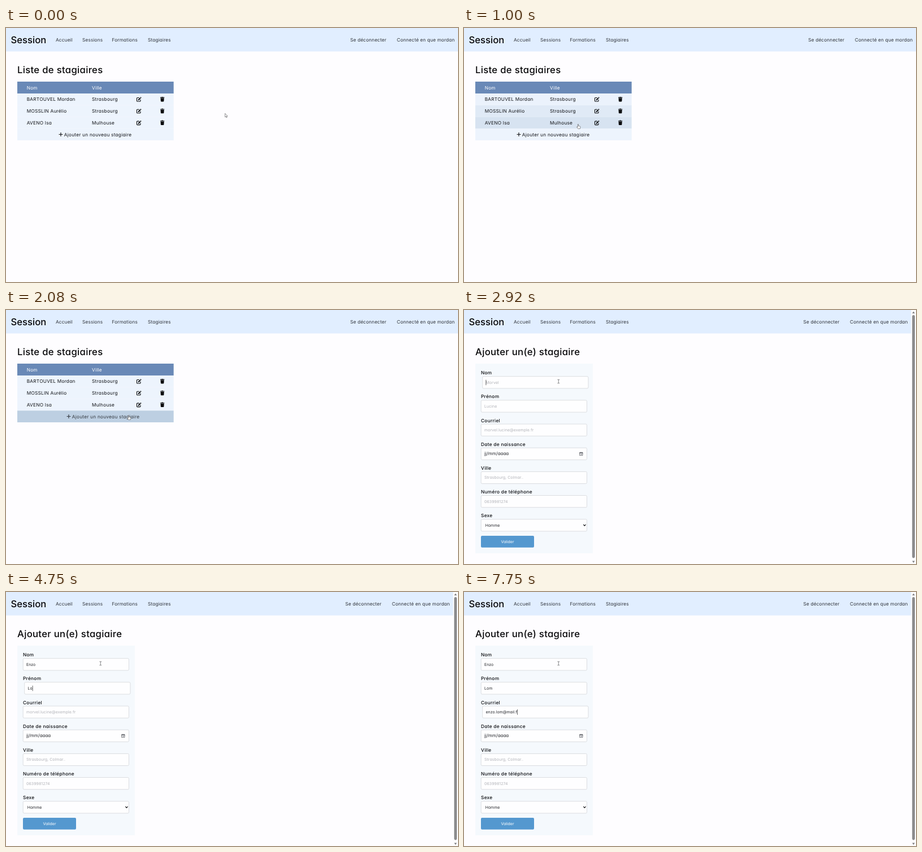
An HTML page that plays this animation: 800 by 450 pixels, repeating every 8 s.

```html
<!DOCTYPE html>
<html lang="fr">
<head>
<meta charset="utf-8">
<style>
html, body { margin: 0; width: 100%; height: 100%; overflow: hidden; background: #fefdff; }
svg { display: block; width: 800px; height: 450px; }
text { font-family: Inter, "Open Sans", sans-serif; font-feature-settings: "cv11"; text-rendering: geometricPrecision; white-space: pre; }
.nav { font-size: 8.3px; letter-spacing: .13px; fill: #32363c; }
.cell { font-size: 8.3px; letter-spacing: .22px; fill: #14161a; }
.brand, .title { font-size: 16.7px; font-weight: 500; fill: #08080a; }
.title { letter-spacing: .3px; }
.label { font-size: 8.3px; font-weight: 500; letter-spacing: .28px; fill: #0c0d10; }
.val { font-size: 7px; fill: #25272b; }
.hint { font-size: 7px; letter-spacing: .04px; fill: #b2b3b8; }
</style>
</head>
<body>
<svg id="stage" viewBox="0 0 800 450"></svg>
<script>
const LOOP = 8000, PAGE = 2250;
const stage = document.getElementById('stage');

function el(parent, tag, attrs, content) {
  const node = document.createElementNS('http://www.w3.org/2000/svg', tag);
  for (const k in attrs) node.setAttribute(k, attrs[k]);
  if (content) node.textContent = content;
  parent.appendChild(node);
  return node;
}
const set = (node, k, v) => node.setAttribute(k, v);
const group = parent => el(parent, 'g', {});
const rect = (p, x, y, width, height, fill, extra) => el(p, 'rect', { x, y, width, height, fill, ...extra });
const text = (p, x, y, cls, s) => el(p, 'text', { x, y, class: cls }, s);
const path = (p, d, extra) => el(p, 'path', { d, ...extra });
const show = (node, on) => set(node, 'visibility', on ? 'visible' : 'hidden');
const line = (stroke, w) => ({ fill: 'none', stroke, 'stroke-width': w, 'stroke-linecap': 'round', 'stroke-linejoin': 'round' });

const clamp = v => Math.max(0, Math.min(1, v));
const smooth = v => { v = clamp(v); return v * v * (3 - 2 * v); };
const mix = (a, b, k) => 'rgb(' + a.map((v, i) => Math.round(v + (b[i] - v) * k)) + ')';

// Interpolates keys of the form [time, value, ...]
function at(keys, t) {
  let i = 0;
  while (i < keys.length - 2 && t >= keys[i + 1][0]) i++;
  const a = keys[i], b = keys[i + 1], k = clamp((t - a[0]) / (b[0] - a[0]));
  return a.slice(1).map((v, j) => v + (b[j + 1] - v) * k);
}

// Header
rect(stage, 0, 0, 800, 41.5, '#e1eeff');
text(stage, 8.5, 27, 'brand', 'Session');
[['Accueil', 88], ['Sessions', 135], ['Formations', 187.5], ['Stagiaires', 251]]
  .forEach(([s, x]) => text(stage, x, 24, 'nav', s));
const account = group(stage);
text(account, 609.3, 24, 'nav', 'Se déconnecter');
text(account, 691.7, 24, 'nav', 'Connecté en que mordan');

// List page
const list = group(stage);
text(list, 20, 80, 'title', 'Liste de stagiaires');
rect(list, 20, 95, 276.7, 21, '#6989b7');
[['Nom', 36.7], ['Ville', 152]].forEach(([s, x]) => set(text(list, x, 108.5, 'cell', s), 'style', 'fill:#fff'));

function editIcon(p, x, y) {
  const g = el(p, 'g', { transform: `translate(${x} ${y})` });
  path(g, 'M4.3 1.5H1.5Q.5 1.5 .5 2.5V7Q.5 8 1.5 8H6Q7 8 7 7V5.3', line('#0b0c0e', 1.1));
  path(g, 'M2.8 4.7 6 1.5 7.4 2.9 4.2 6.1 2.5 6.3ZM6.4 1.1 7 .5Q7.4.2 7.8.6L8.3 1.1Q8.7 1.5 8.4 1.9L7.8 2.5Z', { fill: '#0b0c0e' });
}
function trashIcon(p, x, y) {
  const g = el(p, 'g', { transform: `translate(${x} ${y})` });
  path(g, 'M0 .6H2L2.5 0H4.8L5.3.6H7.3V1.7H0ZM.5 2.2H6.8L6.4 7.6Q6.3 8.4 5.6 8.4H1.7Q1 8.4.9 7.6Z', { fill: '#0b0c0e' });
}

const ROW = [237, 244, 253], HOVER = [189, 207, 226];
const people = [['BARTOUVEL Mordan', 'Strasbourg'], ['MOSSLIN Aurélio', 'Strasbourg'], ['AVENO Isa', 'Mulhouse']];
const rows = [0, 1, 2, 3].map(i => rect(list, 20, 116 + i * 20.75, 276.7, 20.75, '#edf4fd'));
people.forEach(([name, town], i) => {
  const y = 116 + i * 20.8;
  text(list, 36.7, y + 13.3, 'cell', name);
  text(list, 152, y + 13.3, 'cell', town);
  editIcon(list, 231, y + 6);
  trashIcon(list, 273, y + 6);
});
const add = group(list);
path(add, 'M94 188.5H100M97 185.5V191.5', line('#14161a', 1.2));
text(add, 102.8, 191.6, 'cell', 'Ajouter un nouveau stagiaire');

const hovers = [
  [[640, 0], [750, 0.35], [1040, 0]],
  [[750, 0], [870, 0.45], [1190, 0]],
  [[870, 0], [1130, 0.9], [1230, 0.9], [1530, 0]],
  [[1230, 0], [1550, 1]]
];

// Form page
const form = group(stage);
text(form, 20, 80, 'title', 'Ajouter un(e) stagiaire');
rect(form, 20, 95, 208, 336, '#f5f9fd');

function field(i, label, hint) {
  const y = 117.7 + i * 42.17;
  text(form, 30, y - 3.5, 'label', label);
  const g = group(form);
  rect(g, 30.2, y, 187.3, 21.2, '#fefeff', { rx: 2, stroke: '#d3d6da', 'stroke-width': 0.8 });
  const value = text(g, 36, y + 13, 'val', '');
  const ghost = text(g, 36, y + 13, 'hint', hint);
  const caret = rect(g, 36, y + 6, 0.7, 9.5, '#222', { visibility: 'hidden' });
  return { g, value, ghost, caret, last: '' };
}
const fields = [
  ['Nom', 'Morvel'], ['Prénom', 'Lucine'], ['Courriel', 'morvel.lucine@exemple.fr'],
  ['Date de naissance', ''], ['Ville', 'Strasbourg, Colmar..'],
  ['Numéro de téléphone', '0639981274'], ['Sexe', '']
].map(([label, hint], i) => field(i, label, hint));

set(text(form, 36, 257.2, 'val', 'jj/mm/aaaa'), 'style', 'font-size:8px');
path(form, 'M205 252.5H210V257.5H205ZM205 253.6H210M206.2 251.8V252.5M208.8 251.8V252.5M206.6 255.6H208.6', line('#44474c', 0.7));
text(form, 37.7, 383.8, 'val', 'Homme');
path(form, 'M211.6 380.3 213.4 382.3 215.2 380.3', line('#15171a', 1.2));
rect(form, 30, 400, 94, 20.8, '#5498cf', { rx: 2 });
set(text(form, 77, 413, 'val', 'Valider'), 'style', 'fill:#fff;text-anchor:middle');

rect(form, 791.3, 0, 8.7, 450, '#fcfcfd');
rect(form, 793.2, 9, 4.8, 430.5, '#8b8b8d', { rx: 2.4 });
path(form, 'M793.3 6 795.6 2.6 797.9 6ZM793.3 444.6 795.6 448 797.9 444.6Z', { fill: '#7d7d80' });

// Focus span, typed text and the time of each key
const typing = [
  { from: 2650, to: 3960, s: 'Enzo', keys: [3170, 3330, 3500, 3580] },
  { from: 3960, to: 5060, s: 'Lom', keys: [4420, 4750, 4830] },
  { from: 5060, to: 9000, s: 'enzo.lom@mail.f',
    keys: [5420, 5580, 5670, 5830, 6330, 6420, 6500, 6580, 6830, 7000, 7170, 7200, 7250, 7500, 7750] }
];

// Pointers, each with its hot spot at 0,0
const ink = { fill: '#fff', stroke: '#4a4a4e', 'stroke-width': 0.6, 'stroke-linejoin': 'round' };
const arrow = path(stage, 'M0 0V6.5L1.5 5.2 2.5 7.5 3.5 7.1 2.5 4.9H4.5Z', ink);
const hand = path(stage, 'M-.6.6Q0-.2.6.6V3.4L3 3.9Q4 4.2 3.9 5.2L3.4 8.4H-.3L-2.5 5.4Q-2.3 4.4-1.5 4.9L-.6 5.7Z', ink);
const beam = path(stage, 'M-1.5-3.2H-.4L0-2.8 .4-3.2H1.5M0-2.8V2.8M-1.5 3.2H-.4L0 2.8 .4 3.2H1.5', line('#55565a', 0.7));
const track = [
  [60, 387.7, 151.3], [350, 345, 137], [640, 282, 122], [750, 250, 137], [870, 216, 158],
  [1000, 202, 170], [1230, 203, 179], [1670, 217, 186], [2290, 217, 186], [2620, 167.3, 126.5]
];

function drawList(t) {
  hovers.forEach((keys, i) => set(rows[i], 'fill', mix(ROW, HOVER, at(keys, t)[0])));
  const k = at(hovers[3], t)[0];
  set(add, 'transform', `translate(${14 * smooth(k)} 0)`);
  set(add, 'opacity', 1 - 0.2 * k);
}

function drawForm(t) {
  typing.forEach(({ from, to, s, keys }, i) => {
    const f = fields[i];
    const typed = s.slice(0, keys.filter(k => t >= k).length);
    if (typed !== f.last) f.value.textContent = f.last = typed;
    const shift = smooth((t - from) / 260) - smooth((t - to) / 260);
    set(f.g, 'transform', `translate(${2.5 * shift} 0)`);
    show(f.ghost, !typed);
    show(f.caret, t >= from && t < to);
    set(f.caret, 'x', 36.1 + (typed ? f.value.getComputedTextLength() : 0));
  });
}

function draw(t) {
  const onForm = t >= PAGE;
  set(list, 'display', onForm ? 'none' : 'inline');
  set(form, 'display', onForm ? 'inline' : 'none');
  set(account, 'transform', `translate(${onForm ? -8.7 : 0} 0)`);
  if (onForm) drawForm(t); else drawList(t);

  const [x, y] = at(track, t);
  const inField = onForm && x < 217 && y < 139;
  const onRow = !onForm && x < 296.7;
  [[arrow, !inField && !onRow], [hand, onRow], [beam, inField]].forEach(([p, on]) => {
    show(p, on);
    set(p, 'transform', `translate(${x} ${y})`);
  });
}

function tick() {
  draw(performance.now() % LOOP);
  requestAnimationFrame(tick);
}
tick();
</script>
</body>
</html>
```
